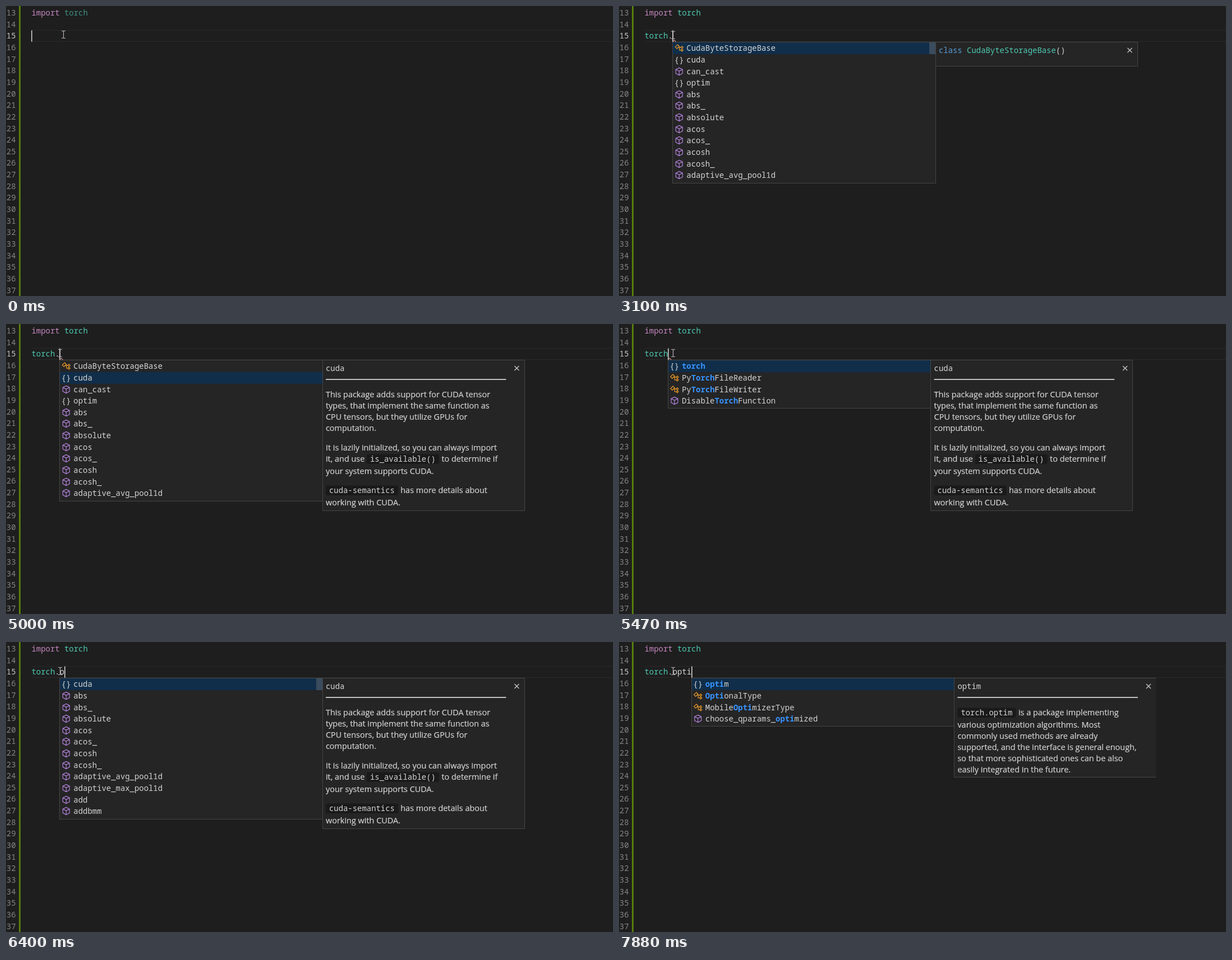
Write an HTML page that moves like this. It is 1082 by 518 pixels and loops after 8 s.

```html
<!DOCTYPE html>
<html lang="en">
<head>
<meta charset="utf-8">
<title>Editor completion</title>
<style>
  html, body { margin: 0; width: 100%; height: 100%; overflow: hidden; background: #1e1e1e; }
  svg { display: block; }
  text { white-space: pre; fill: #d4d4d4; font: 500 13.93px "Noto Sans Mono", "DejaVu Sans Mono", monospace; }
  .prose { font: 14.45px "Open Sans", "Noto Sans", sans-serif; stroke: #d4d4d4; stroke-width: 0.2; }
  .num { fill: #858585; text-anchor: end; }
  .now { fill: #c6c6c6; }
  .key { fill: #c586c0; }
  .word { fill: #569cd6; }
  .type { fill: #4ec9b0; }
  .dim { fill: #3e8f80; }
  .hit { fill: #3794ff; font-weight: bold; }
  .box { fill: #252526; stroke: #454545; }
  .line { fill: none; stroke-width: 1.2; }
</style>
</head>
<body>
<svg id="stage" width="1082" height="518" viewBox="0 0 1082 518"></svg>
<script>
const LOOP = 8000, CHAR = 8.36, ROW = 20.65, LEFT = 45.5;
const stage = document.getElementById('stage');

const methods = names => names.split(' ').map(name => 'm:' + name);
const LISTS = {
  all: ['c:CudaByteStorageBase', 'n:cuda', 'm:can_cast', 'n:optim',
    ...methods('abs abs_ absolute acos acos_ acosh acosh_ adaptive_avg_pool1d')],
  recent: ['n:cuda',
    ...methods('abs abs_ absolute acos acos_ acosh acosh_ adaptive_avg_pool1d adaptive_max_pool1d add addbmm')],
  torch: ['n:*torch*', 'c:Py*Torch*FileReader', 'c:Py*Torch*FileWriter', 'm:Disable*Torch*Function'],
  optim: ['n:*opti*m', 'c:*Opti*onalType', 'c:Mobile*Opti*mizerType', 'm:choose_qparams_*opti*mized']
};

// Body entries: [x offset, baseline, text]; text after a backtick is a code chip.
const DOCS = {
  base: { end: 107.5, title: '<tspan class="word">class</tspan> <tspan class="type">CudaByteStorageBase</tspan>()' },
  torch: { end: 107.5, title: 'torch' },
  cuda: { end: 333.5, title: 'cuda', body: [
    [5.7, 131, 'This package adds support for CUDA tensor'],
    [5.7, 151, 'types, that implement the same function as'],
    [5.7, 171, 'CPU tensors, but they utilize GPUs for'],
    [5.7, 191, 'computation.'],
    [5.7, 226, 'It is lazily initialized, so you can always import'],
    [5.7, 246, 'it, and use'],
    [78.7, 246, '`is_available()'],
    [212.2, 246, 'to determine if'],
    [5.7, 268, 'your system supports CUDA.'],
    [5.7, 302, '`cuda-semantics'],
    [139, 302, 'has more details about'],
    [5.7, 324, 'working with CUDA.']
  ] },
  optim: { end: 241.5, open: true, title: 'optim', body: [
    [5.7, 131, '`torch.optim'],
    [114.2, 131, 'is a package implementing'],
    [5.7, 153, 'various optimization algorithms. Most'],
    [5.7, 173, 'commonly used methods are already'],
    [5.7, 193, 'supported, and the interface is general enough,'],
    [5.7, 213, 'so that more sophisticated ones can be also'],
    [5.7, 233, 'easily integrated in the future.']
  ] }
};

// Each step changes part of the state from its time on.
const STEPS = [
  [0, { code: '', caret: 1, mouse: [102, 51], known: 0, typed: 0, list: '', sel: 0, doc: '', col: 6, slider: 0, wave: 0 }],
  [150, { mouse: [99, 51] }],
  [250, { mouse: [96, 52] }],
  [390, { caret: 0 }],
  [610, { code: 't', caret: 1 }],
  [690, { code: 'to' }],
  [840, { code: 'tor' }],
  [1070, { code: 'torc' }],
  [1400, { code: 'torch' }],
  [1850, { caret: 0 }],
  [2020, { code: 'torch.', caret: 1 }],
  [2410, { list: 'all' }],
  [2490, { doc: 'base' }],
  [2560, { caret: 0 }],
  [2640, { typed: 1, wave: 1 }],
  [2720, { known: 1 }],
  [3020, { caret: 1, slider: 0.5 }],
  [3100, { slider: 1 }],
  [3430, { sel: 1 }],
  [3520, { caret: 0 }],
  [3590, { doc: 'cuda' }],
  [3680, { slider: 0.4 }],
  [3760, { slider: 0 }],
  [3980, { caret: 1 }],
  [4520, { caret: 0 }],
  [5000, { caret: 1 }],
  [5390, { code: 'torch' }],
  [5470, { list: 'torch', sel: 0, col: 5 }],
  [5610, { doc: 'torch' }],
  [5760, { wave: 0 }],
  [5840, { caret: 0 }],
  [6080, { code: 'torch.', caret: 1, list: '', doc: '' }],
  [6170, { list: 'recent', col: 6, slider: 0.5 }],
  [6260, { doc: 'cuda', slider: 1 }],
  [6400, { code: 'torch.o' }],
  [6550, { code: 'torch.op' }],
  [6630, { code: 'torch.opt', list: '', doc: '', slider: 0 }],
  [6710, { code: 'torch.opti' }],
  [6790, { list: 'optim', col: 10 }],
  [6870, { doc: 'optim' }],
  [7400, { caret: 0 }],
  [7880, { caret: 1 }]
];

const text = (x, y, body, cls = '') => `<text x="${x}" y="${y}" class="${cls}">${body}</text>`;
const rect = (x, y, w, h, fill, more = '') =>
  `<rect x="${x}" y="${y}" width="${w}" height="${h}" fill="${fill}" ${more}/>`;
const line = (d, color) => `<path class="line" d="${d}" stroke="${color}"/>`;
const span = (cls, body) => `<tspan class="${cls}">${body}</tspan>`;
const edge = x => Math.floor(x) + 0.5;

const ICONS = {
  n: text(-8.4, 5, '{}'),
  m: line('M0-6.6 6-3.6V3.4L0 6.6-6 3.4V-3.6ZM-6-3.6 0-.6 6-3.6M0-.6V6.6', '#b180d7'),
  c: line('M-7-1.8-2.8-6 .2-3-4 1.2ZM-1.6-1.2H3M.4-1.2V4H3M5-3.2 7-1.2 5 .8 3-1.2ZM5 2 7 4 5 6 3 4Z', '#ee9d28')
};

function editor(s) {
  let out = rect(23, 0, 3, 518, '#587c0c');
  out += rect(46, 43, 1036, 1, '#2a2a2a') + rect(46, 63, 1036, 1, '#2a2a2a');
  for (let i = 0; i < 25; i++) {
    out += text(17.5, Math.round(17 + i * ROW), 13 + i, i === 2 ? 'num now' : 'num');
  }
  out += text(LEFT, 17, span('key', 'import') + ' ' + span(s.known ? 'type' : 'dim', 'torch'));
  const code = s.typed ? span('type', s.code.slice(0, 5)) + s.code.slice(5) : s.code;
  out += text(LEFT, 58, code);
  if (s.wave) {
    const x = LEFT + CHAR * s.code.length;
    out += line(`M${x} 64l3-3 3 3`, '#c08a8a');
  }
  if (s.caret) out += rect(Math.round(45.3 + CHAR * s.code.length), 43.5, 1.7, 20.3, '#c4c4c0');
  return out;
}

function listBox(s, x) {
  const rows = LISTS[s.list], left = edge(x);
  let out = `<rect class="box" x="${left}" y="64.5" width="469" height="${Math.round(rows.length * ROW + 3.8)}"/>`;
  out += rect(left + 0.5, 65 + s.sel * ROW, 468, 21, '#102e4a');
  if (s.slider) out += rect(left + 457.5, 65, 11, 21, '#797979', `opacity="${0.4 * s.slider}"`);
  rows.forEach((row, i) => {
    const y = Math.round(75.2 + i * ROW);
    const label = row.slice(2).split('*').map((part, k) => k % 2 ? span('hit', part) : part).join('');
    out += `<g transform="translate(${x + 11.6} ${y})">${ICONS[row[0]]}</g>` + text(x + 24.7, y + 5, label);
  });
  return out;
}

function docBox(s, x) {
  const doc = DOCS[s.doc], left = edge(x), right = left + 360;
  let out = `<path class="box" d="M${right} 64.5H${left}V${doc.end}H${right}${doc.open ? '' : 'Z'}"/>`;
  out += text(x + 5.7, 84, doc.title);
  out += line(`M${x + 342.2} 75l8 8m0-8l-8 8`, '#d0d0d0');
  if (!doc.body) return out;
  out += rect(x + 5.7, 98, 321.5, 2, '#c0c0c0');
  for (const [dx, y, body] of doc.body) {
    if (body[0] === '`') {
      const chip = body.slice(1);
      out += rect(x + dx, y - 13.5, chip.length * CHAR + 12, 17.5, '#1a1a1b', 'rx="3"');
      out += text(x + dx + 6, y, chip);
    } else {
      out += text(x + dx, y, body, 'prose');
    }
  }
  return out;
}

function pointer([x, y]) {
  const d = 'M-3.5-6.5h2.5l1 1 1-1h2.5M0-5.5v11M-3.5 6.5h2.5l1-1 1 1h2.5';
  return `<g transform="translate(${x + 0.5} ${y})">${line(d, '#b8aeb8')}</g>`;
}

function draw(s) {
  const x = LEFT + CHAR * s.col;
  stage.innerHTML = editor(s) +
    (s.list ? listBox(s, x) : '') +
    (s.doc ? docBox(s, x + 468.6) : '') +
    pointer(s.mouse);
}

let shown = -1;
function tick() {
  const t = performance.now() % LOOP;
  const count = STEPS.filter(([at]) => at <= t).length;
  if (count !== shown) {
    shown = count;
    draw(Object.assign({}, ...STEPS.slice(0, count).map(([, change]) => change)));
  }
  requestAnimationFrame(tick);
}
tick();
</script>
</body>
</html>
```
